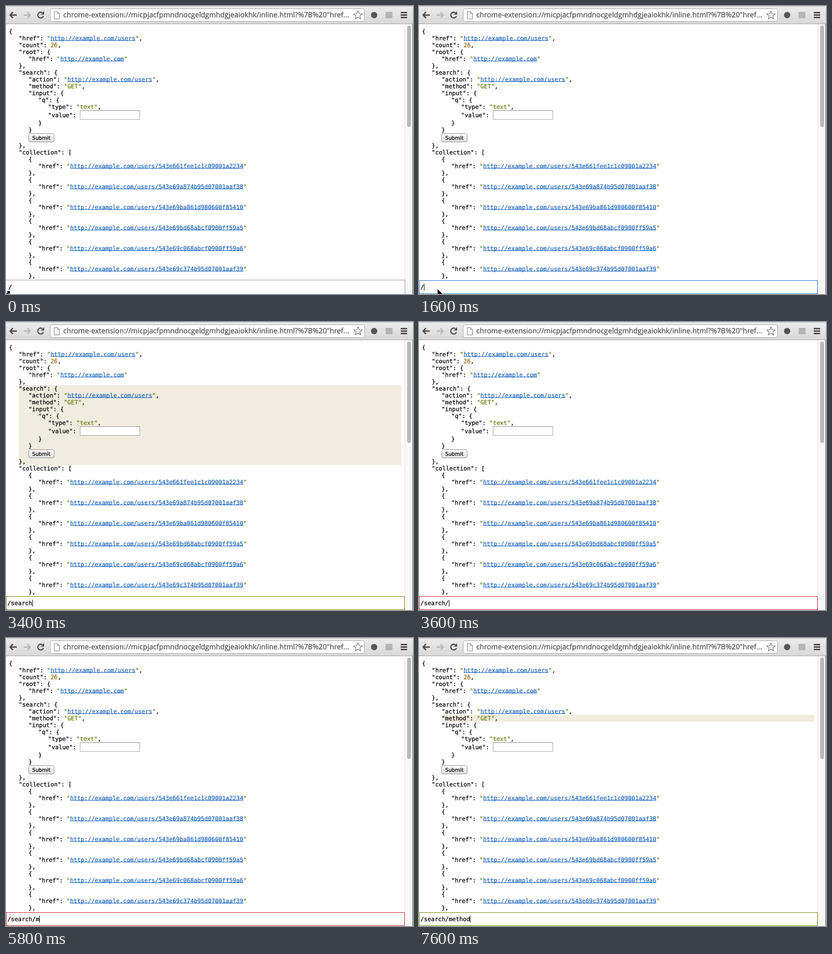
These frames come from a looping animation (832 px wide and 588 px high, 7.8 s). An HTML page with a canvas:

```html
<!DOCTYPE html>
<html lang="en">
<head>
<meta charset="utf-8">
<title>JSON browser</title>
<style>
html, body { margin: 0; width: 100%; height: 100%; overflow: hidden; background: #fff; }
canvas { position: absolute; left: 0; top: 0; }
.text {
  position: absolute; white-space: pre; color: #000;
  font: 12px/14px "DejaVu Sans Mono", monospace;
  text-rendering: geometricPrecision;
  -webkit-text-stroke: .25px currentColor;
}
.text a {
  color: #2068c0; text-decoration: underline 1px;
  text-decoration-skip-ink: none; text-underline-offset: 0;
}
.text i { font-style: normal; color: #667a08; }
.text b { font-weight: normal; color: #926a06; }
#url { left: 117px; top: 8px; color: #4c4c4c; font: 14.7px/20px "Open Sans", "Noto Sans", sans-serif; }
#submit { left: 53.5px; top: 263px; font: 10.5px/14px "DejaVu Sans", sans-serif; }
#typed { top: 567px; }
</style>
</head>
<body>
<canvas id="stage" width="832" height="588"></canvas>
<div id="page"></div>
<div id="url" class="text">chrome-extension://micpjacfpmndnocgeldgmhdgjeaiokhk/inline.html?%7B%20"href...</div>
<div id="submit" class="text">Submit</div>
<div id="typed" class="text"></div>
<script>
const LOOP = 7800, STEP = 200, CHAR = 7.224;
const BLUE = '#2176c7', GREEN = '#738a05', RED = '#d11c24';
const ctx = document.getElementById('stage').getContext('2d');
const page = document.getElementById('page');
const typed = document.getElementById('typed');

// ---- page text
const str = s => `<i>"${s}"</i>`;
const link = s => `<i>"</i><a>${s}</a><i>"</i>`;
const site = 'http://example.com';

function row(top, level, html) {
  const el = document.createElement('div');
  el.className = 'text';
  el.style.left = 6 + level * 20 + 'px';
  el.style.top = top + 'px';
  el.innerHTML = html;
  page.append(el);
}

[
  [0, '{'],
  [1, `"href": ${link(site + '/users')},`],
  [1, '"count": <b>26</b>,'],
  [1, '"root": {'],
  [2, `"href": ${link(site)}`],
  [1, '},'],
  [1, '"search": {'],
  [2, `"action": ${link(site + '/users')},`],
  [2, `"method": ${str('GET')},`],
  [2, '"input": {'],
  [3, '"q": {'],
  [4, `"type": ${str('text')},`]
].forEach(([level, html], i) => row(45 + i * 14, level, html));
row(216, 4, '"value":');
row(232, 3, '}');
row(246, 2, '}');
row(278, 1, '},');
row(292, 1, '"collection": [');
[
  '543e661fee1c1c09001a2234', '543e69a874b95d07001aaf38',
  '543e69ba861d980600f85410', '543e69bd68abcf0900ff59a5',
  '543e69c068abcf0900ff59a6', '543e69c374b95d07001aaf39'
].forEach((id, i) => {
  const top = 306 + i * 42;
  row(top, 2, '{');
  row(top + 14, 3, `"href": ${link(site + '/users/' + id)}`);
  row(top + 28, 2, '},');
});

// ---- drawing helpers
function rect(x, y, w, h, color) {
  ctx.fillStyle = color;
  ctx.fillRect(x, y, w, h);
}
function frame(x, y, w, h, color) {
  ctx.strokeStyle = color;
  ctx.lineWidth = 1;
  ctx.strokeRect(x + .5, y + .5, w - 1, h - 1);
}
function round(x, y, w, h, r, fill, stroke) {
  ctx.beginPath();
  ctx.roundRect(x, y, w, h, r);
  ctx.fillStyle = fill;
  ctx.fill();
  if (stroke) {
    ctx.strokeStyle = stroke;
    ctx.lineWidth = 1;
    ctx.stroke();
  }
}
function path(points, closed) {
  ctx.beginPath();
  points.forEach(([x, y]) => ctx.lineTo(x, y));
  if (closed) ctx.closePath();
}
function line(points, color, width) {
  path(points);
  ctx.strokeStyle = color;
  ctx.lineWidth = width;
  ctx.stroke();
}
function fade(y0, y1, top, bottom) {
  const g = ctx.createLinearGradient(0, y0, 0, y1);
  g.addColorStop(0, top);
  g.addColorStop(1, bottom);
  return g;
}

function arrow(x, dir, color) {
  line([[x - 6 * dir, 18.5], [x + 7 * dir, 18.5]], color, 2.8);
  line([[x - dir, 12.5], [x - 6.5 * dir, 18.5], [x - dir, 24.5]], color, 2.8);
}

function toolbar() {
  rect(0, 0, 832, 36, fade(0, 36, '#ececec', '#d8d8d8'));
  rect(0, 0, 832, 1, '#c0c0c0');
  rect(0, 36, 832, 1, '#a3a3a3');
  arrow(15, 1, '#4c4c4c');
  arrow(43, -1, '#b9b9b9');

  ctx.beginPath();
  ctx.arc(71, 18.5, 6, .35, 5.3);
  ctx.strokeStyle = '#4c4c4c';
  ctx.lineWidth = 2.5;
  ctx.stroke();
  path([[78, 10.5], [78, 17.5], [71, 17.5]], true);
  ctx.fillStyle = '#4c4c4c';
  ctx.fill();

  round(90.5, 5.5, 642, 26, 3, '#fff', '#a9a9a9');
  path([[98.5, 11.5], [105.5, 11.5], [109.5, 15.5], [109.5, 26.5], [98.5, 26.5]], true);
  ctx.fillStyle = '#f7f7f7';
  ctx.fill();
  ctx.strokeStyle = '#858585';
  ctx.lineWidth = 1;
  ctx.stroke();
  line([[105.5, 11.5], [105.5, 15.5], [109.5, 15.5]], '#858585', 1);

  const star = Array.from({ length: 10 }, (_, i) => {
    const r = i % 2 ? 4 : 9, a = i * Math.PI / 5 - Math.PI / 2;
    return [719.5 + r * Math.cos(a), 19 + r * Math.sin(a)];
  });
  path(star, true);
  ctx.strokeStyle = '#6f6f6f';
  ctx.lineWidth = 1.2;
  ctx.stroke();

  round(746, 12, 13, 13, 6.5, '#555');
  rect(776, 12, 14, 13, '#b4b4b4');
  [12, 17, 22].forEach(y => rect(807, y, 13, 3, '#4c4c4c'));
}

function content() {
  rect(815, 37, 16, 551, '#f8f8f8');
  rect(815, 37, 1, 551, '#e2e2e2');
  round(820, 40, 8, 207, 4, '#b9b9b9');
  rect(831, 0, 1, 588, '#555');

  rect(151, 213, 123, 19, '#fff');
  frame(151, 213, 123, 19, '#a6a6a6');
  rect(151, 213, 123, 1, '#8c8c8c');
  round(46.5, 260.5, 52, 17, 3.5, fade(260, 278, '#fff', '#dedede'), '#8f8f8f');
}

function pointer(x, y) {
  path([[0, 0], [0, 14], [3, 11], [5.5, 16.5], [8, 15.5], [5.7, 10.5], [10, 10]]
    .map(p => [p[0] + x, p[1] + y]), true);
  ctx.strokeStyle = '#fff';
  ctx.lineWidth = 2;
  ctx.stroke();
  ctx.fillStyle = '#000';
  ctx.fill();
}
function resizePointer() {
  path([[1, 582], [8, 582], [8, 589], [5.5, 586.5], [2, 590], [0, 588], [3.5, 584.5]], true);
  ctx.strokeStyle = '#fff';
  ctx.lineWidth = 2;
  ctx.stroke();
  ctx.fillStyle = '#000';
  ctx.fill();
}

// ---- timeline
const FOCUS = 1400, HIDE = 1800;
const FULL = '/search/method';
const keys = [0, 1800, 2000, 2200, 2400, 2600, 2950, 3600, 5800, 6200, 6400, 6600, 6800, 7150];
const matches = {
  '/search': [26, 129, 163],
  '/search/method': [46, 157, 14]
};
const clamp = v => Math.min(1, Math.max(0, v));

function draw(t) {
  const count = keys.filter(k => k <= t).length;
  const text = FULL.slice(0, count);
  const since = t - Math.max(keys[count - 1], FOCUS);
  const match = matches[text];
  const focused = t >= FOCUS;

  rect(0, 0, 832, 588, '#fff');
  if (match) {
    const [x, y, h] = match;
    ctx.globalAlpha = clamp(since / 400);
    rect(x, y, 808 - x, h, '#f0ecdf');
    ctx.globalAlpha = 1;
  }
  content();
  toolbar();

  // path field
  rect(0, 559, 815, 29, '#fff');
  if (focused) {
    frame(0, 560, 815, 28, text === '/' ? BLUE : match ? GREEN : RED);
    if (since % 1000 <= 500) rect(Math.round(3 + count * CHAR), 567, 1, 14, '#000');
  } else {
    rect(0, 559, 816, 1, '#9c9c9c');
    rect(815, 559, 1, 29, '#9c9c9c');
  }
  typed.textContent = text;
  typed.style.left = focused ? '3px' : '5px';

  if (t < STEP) resizePointer();
  else if (t < HIDE) {
    const p = clamp((t - STEP) / 1000), e = p * p * (3 - 2 * p);
    pointer(4 + 34 * e, 583 - 5 * e);
  }
}

let last = -1;
function tick() {
  const t = Math.floor(performance.now() % LOOP / STEP) * STEP;
  if (t !== last) draw(last = t);
  requestAnimationFrame(tick);
}
tick();
</script>
</body>
</html>
```
